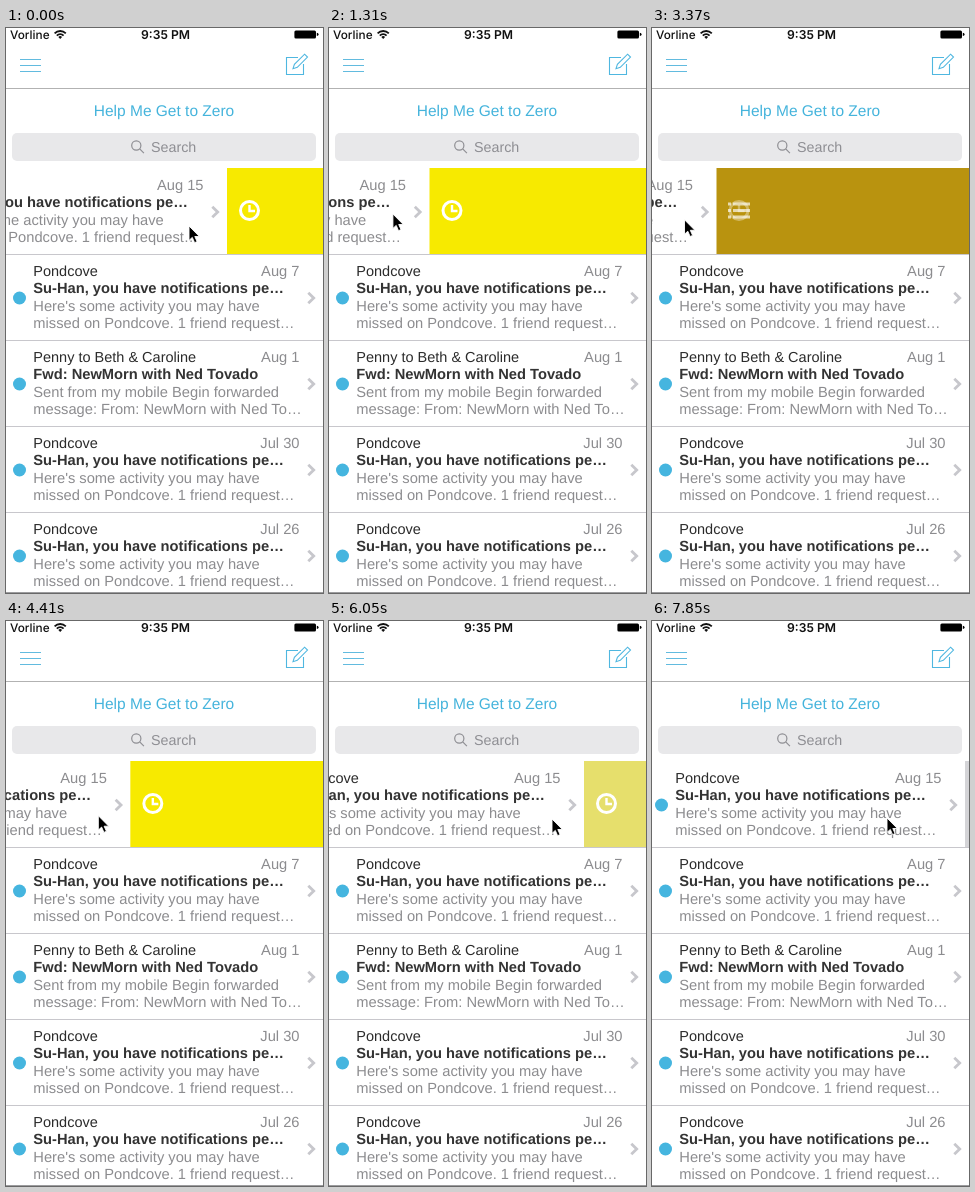
An HTML page for the animation above (8 s loop, 317 by 565 pixels).

```html
<!DOCTYPE html>
<html lang="en">
<head>
<meta charset="utf-8">
<title>Inbox swipe</title>
<style>
  html, body { margin: 0; width: 100%; height: 100%; overflow: hidden; background: #fff; }
  svg { display: block; width: 100vw; height: 100vh; }
  text { font: 14.7px "Liberation Sans", Arial, sans-serif; text-rendering: geometricPrecision; white-space: pre; }
  .status { font: 500 11.8px Inter, sans-serif; fill: #111; }
  .time { font-weight: 600; font-size: 12.2px; }
  .link { font-size: 15.5px; fill: #45b4dc; }
  .search { font-size: 14.3px; fill: #8e8e93; }
  .name { font-size: 14.5px; fill: #2b2b2b; }
  .subject { font-weight: bold; fill: #333; }
  .body, .date { fill: #8c8c8f; }
  .date { text-anchor: end; }
  .mid { text-anchor: middle; }
  .line { fill: none; }
</style>
</head>
<body>
<svg viewBox="0 0 317 565" xmlns="http://www.w3.org/2000/svg">
  <rect width="317" height="565" fill="#fff"/>

  <!-- status bar -->
  <text class="status" x="4" y="10.5">Vorline</text>
  <g class="line" stroke="#111" stroke-width="1.8">
    <path d="M48.6 5.3a8 8 0 0 1 11.2 0M50.8 7.6a4.9 4.9 0 0 1 6.8 0"/>
    <path d="M54.2 11l-1.9-2a2.7 2.7 0 0 1 3.8 0z" fill="#111" stroke="none"/>
  </g>
  <text class="status time mid" x="159.5" y="10.5">9:35 PM</text>
  <rect x="288.4" y="2.4" width="21.6" height="8" rx="1.5"/>
  <path d="M310.8 4.8q1.8 .2 1.8 1.6t-1.8 1.6z"/>

  <!-- navigation bar -->
  <g class="line" stroke="#4fb7e0">
    <path d="M14 31.5H35M14 37.5H35M14 43.5H35" stroke="#62bbdf"/>
    <path d="M297.5 36V46.5H280.5V29.5H292" stroke-width="1.1"/>
    <path d="M287 40.7l1.4-4.3L298.6 26.2l2.9 2.9L291.3 39.3z" stroke-width="1.1"/>
  </g>
  <rect y="60" width="317" height="1" fill="#b2b2b2"/>

  <text class="link mid" x="158" y="88">Help Me Get to Zero</text>
  <rect x="6" y="105" width="304" height="28" rx="5" fill="#e8e8ea"/>
  <g class="line" stroke="#8e8e93" stroke-width="1.2">
    <circle cx="130.3" cy="117.5" r="4.6"/>
    <path d="M133.7 120.9l4.2 4.2"/>
  </g>
  <text class="search" x="145" y="124">Search</text>

  <g id="list"></g>

  <!-- swipe panel -->
  <rect id="panel" y="140" height="86"/>
  <g id="icon" class="line" stroke="#fff" stroke-width="3">
    <g id="clock">
      <circle r="9"/>
      <path d="M0 -5.5V.5H5.5" stroke-width="2.4"/>
    </g>
    <path id="bullets" d="M-11 -6.5h3M-6 -6.5h17M-11 0h3M-6 0h17M-11 6.5h3M-6 6.5h17"/>
  </g>

  <rect y="564" width="317" height="1" fill="#9c9c9e"/>
  <path id="cursor" d="M0 0V14.4L3.3 11.4L5.6 16.7L8.1 15.6L5.8 10.5H10.4Z"
        stroke="#fff" stroke-width=".9"/>
</svg>

<script>
const $ = id => document.getElementById(id);
const LOOP = 8000, STEPS = 54, LEAD = 40;
const WIDTH = 317, TOP = 140, ROW = 86;
const YELLOW = [247, 234, 0], BROWN = [153, 102, 22], GRAY = [212, 212, 215];

const notice = date => ({
  date, name: 'Pondcove', subject: 'Su-Han, you have notifications pe…',
  body: ['Here\'s some activity you may have', 'missed on Pondcove. 1 friend request…']
});
const mails = [
  notice('Aug 15'),
  notice('Aug 7'),
  {
    date: 'Aug 1', name: 'Penny to Beth & Caroline', subject: 'Fwd: NewMorn with Ned Tovado',
    body: ['Sent from my mobile Begin forwarded', 'message: From: NewMorn with Ned To…']
  },
  notice('Jul 30'),
  notice('Jul 26')
];

const label = (cls, x, y, s) =>
  `<text class="${cls}" x="${x}" y="${y}">${s.replace('&', '&amp;')}</text>`;

const mailRow = (m, i) => {
  const y = TOP + i * ROW;
  const rule = i ? `<rect y="${y}" width="${WIDTH}" height="1" fill="#c8c7cc"/>` : '';
  return `${rule}<g id="row${i}">
    <circle cx="13.5" cy="${y + 44}" r="6.5" fill="#45b5df"/>
    ${label('name', 27.3, y + 22, m.name)}
    ${label('date', 293.5, y + 22, m.date)}
    ${label('subject', 27.3, y + 39.3, m.subject)}
    ${label('body', 27.3, y + 57, m.body[0])}
    ${label('body', 27.3, y + 74, m.body[1])}
    <path class="line" d="M302.3 ${y + 38.7}l5.4 5.3l-5.4 5.3" stroke="#c7c7cc" stroke-width="2.8"/>
  </g>`;
};
$('list').innerHTML = mails.map(mailRow).join('');

const mix = (a, b, k) => a + (b - a) * k;
const blend = (a, b, k) => a.map((v, i) => mix(v, b[i], k));

// Strokes are [first step, last step, end value]; the value rests between them.
const glide = (value, ...strokes) => step => strokes.reduce(
  (v, [a, b, end]) => mix(v, end, Math.min(1, Math.max(0, (step - a) / (b - a)))), value);

const RELEASE = 41;
const rowShift = glide(-96, [0, 2, -127], [3, 9, -216.5], [9, 16, -257.5], [16, 19, -277],
  [20, 26, -228], [28, 31, -175], [33, 35, -82], [37, RELEASE, -62],
  [RELEASE, 43, -12], [43, 45, 0], [52, 53, -4]);
const grip = glide(279, [0, 16, 281.5], [20, 23, 285]);
const freeX = glide(223, [RELEASE, 42, 228], [46, 48, 263], [49, 53, 235]);
const cursorY = glide(198, [0, 9, 186], [9, 38, 198], [46, 48, 201], [49, 53, 197]);
const brownMix = glide(0, [16, 18, 1], [22, 23, .66], [23, 24, 0]);
const grayMix = glide(0, [40, 42, 1]);

const set = (id, attrs) => {
  for (const key in attrs) $(id).setAttribute(key, attrs[key]);
};

function draw(time) {
  const step = Math.min(STEPS - 1, Math.floor((time % LOOP + LEAD) / LOOP * STEPS));
  const shift = rowShift(step), brown = brownMix(step), edge = WIDTH + shift;
  const x = step <= RELEASE ? shift + grip(step) : freeX(step);
  const color = blend(blend(YELLOW, BROWN, brown), GRAY, grayMix(step)).map(Math.round);

  set('row0', { transform: `translate(${shift})` });
  set('panel', { x: edge, width: -shift, fill: `rgb(${color})` });
  set('icon', { transform: `translate(${edge + 22.5} 182.5)`, opacity: shift < 0 ? 1 : 0 });
  set('clock', { opacity: 1 - brown });
  set('bullets', { opacity: brown });
  set('cursor', { transform: `translate(${x} ${cursorY(step)})` });
}

const start = performance.now();
function tick() {
  draw(performance.now() - start);
  requestAnimationFrame(tick);
}
tick();
</script>
</body>
</html>
```
